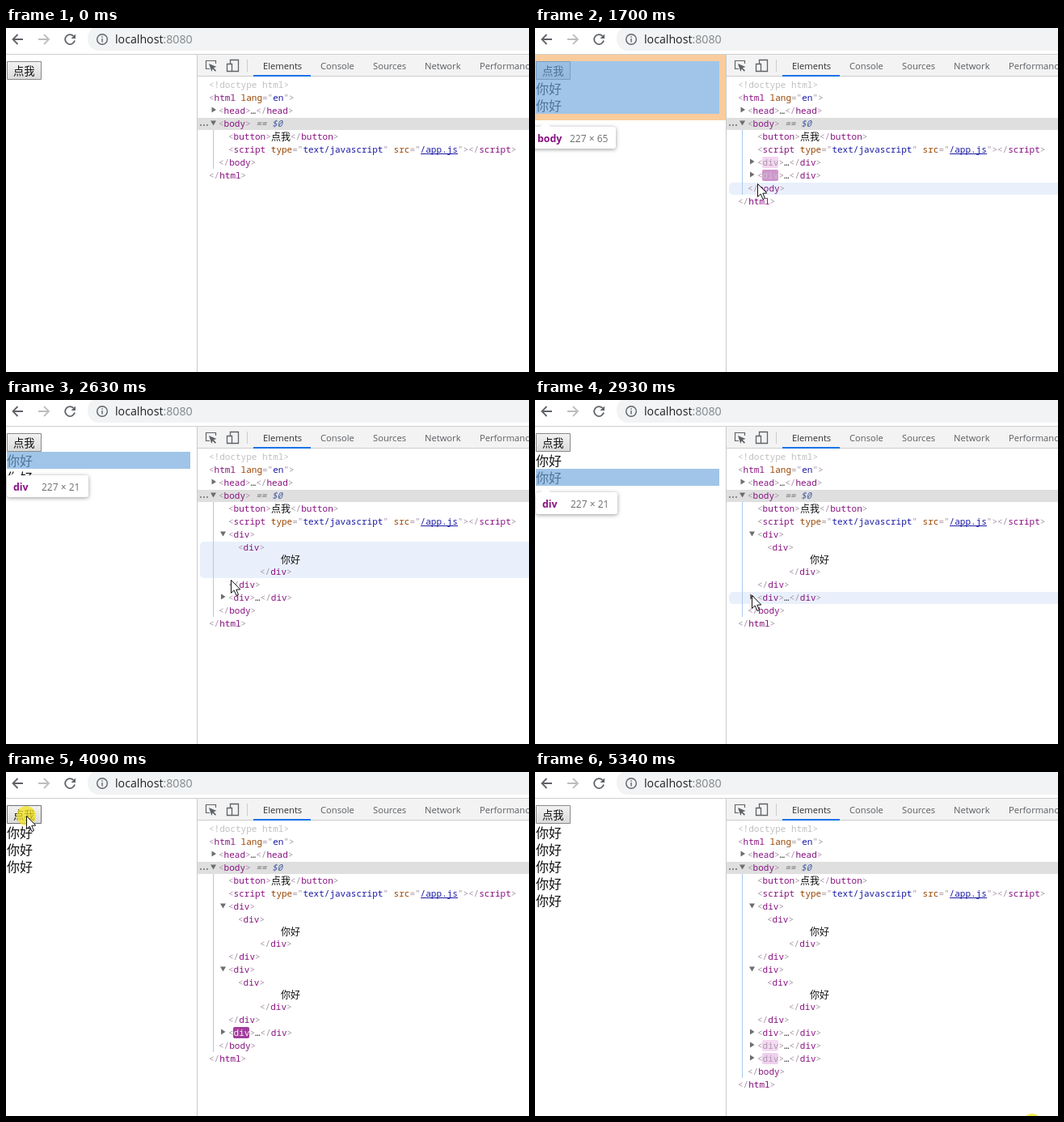
An HTML page with a canvas that plays this animation: 647 by 425 pixels, repeating every 5.42 s.

```html
<!DOCTYPE html>
<html lang="en">
<head>
<meta charset="utf-8">
<style>
html, body { margin: 0; width: 100%; height: 100%; overflow: hidden; background: #fff; }
canvas { display: block; }
</style>
</head>
<body>
<canvas id="stage" width="647" height="425"></canvas>
<script>
const c = document.getElementById('stage').getContext('2d');
const LOOP = 5420, TICK = 77.7, HOVER_LAG = 40;
const CJK = '"Noto Sans CJK SC", "Noto Sans CJK", "Noto Sans CJK JP", sans-serif';
const UI = '"Open Sans", "Noto Sans", sans-serif';
const CODE = '11px "Noto Sans Mono", "DejaVu Sans Mono", monospace';
const BRACKET = '#a894a6', TAG = '#881280', ATTR = '#994500', VALUE = '#1a1aa6', ICON = '#5f6368';

const added = [750, 1300, 3990, 4300, 4500];
const expanded = [2160, 3170];
const clicks = [...added, ...expanded, 5380];

// Cursor moves: start, end, x, y; equal times jump
const moves = [
  [130, 130, 47, 226],
  [130, 560, 16, 48],
  [1390, 1580, 262, 214],
  [1580, 1680, 275, 192],
  [1780, 2010, 268, 166],
  [2400, 2616, 278, 222],
  [2640, 2850, 268, 241],
  [3180, 3390, 83, 152],
  [3400, 3860, 25, 54],
  [4720, 4720, 615, 434],
];

const clamp = v => Math.max(0, Math.min(1, v));
const smooth = p => p * p * (3 - 2 * p);
const easeOut = p => 1 - (1 - p) ** 2;
const mix = (a, b, k) => a.map((v, i) => v + (b[i] - v) * k);
const rgb = v => `rgb(${v.map(Math.round)})`;

function cursorAt(t) {
  return moves.filter(m => m[0] <= t).reduce((pos, [from, to, x, y]) =>
    mix(pos, [x, y], to > from ? smooth(clamp((t - from) / (to - from))) : 1), [0, -40]);
}

function rect(x, y, w, h, color, r = 0) {
  c.fillStyle = color;
  c.beginPath();
  c.roundRect(x, y, w, h, r);
  c.fill();
}

function text(s, x, y, color, font) {
  c.font = font;
  c.fillStyle = color;
  c.fillText(s, x, y);
  return x + c.measureText(s).width;
}

function fill(d, color) {
  c.fillStyle = color;
  c.fill(new Path2D(d));
}

function stroke(d, color, width) {
  c.strokeStyle = color;
  c.lineWidth = width;
  c.stroke(new Path2D(d));
}

const code = (x, y, ...parts) =>
  parts.reduce((at, [color, s]) => text(s, at, y + 4, color, CODE), x);
const open = (name, color = TAG) => [[BRACKET, '<'], [color, name], [BRACKET, '>']];
const close = name => [[BRACKET, '</'], [TAG, name], [BRACKET, '>']];
const attr = (name, value) => [[ATTR, ' ' + name], [BRACKET, '="'], [VALUE, value], [BRACKET, '"']];
const dots = ['#222', '…'];

function toggle(x, y, down) {
  fill(down ? `M${x - 3.5} ${y - 3.5}h7l-3.5 6z` : `M${x - 2.5} ${y - 4.5}l5.5 3.5l-5.5 3.5z`, '#6e6e6e');
}

// Fading mark behind a new tag name; returns the text colour
function flash(x, y, age) {
  if (age >= 1290) return TAG;
  const k = easeOut(clamp(age / 1120));
  c.globalAlpha = 1 - clamp((age - 1120) / 170);
  rect(x, y - 7, 20, 14, rgb(mix([158, 54, 153], [245, 219, 244], k)), 2);
  c.globalAlpha = 1;
  return rgb(mix([255, 255, 255], [168, 148, 166], k));
}

function browserBar() {
  rect(101, -2, 580, 30, '#f1f3f4', 14);
  rect(0, 32, 647, 1, '#d0d0d0');
  stroke('M21 14H8.5M14.5 8l-6 6l6 6', ICON, 1.8);
  stroke('M40 14H53M47 8l6 6l-6 6', '#bcbec0', 1.8);
  stroke('M83.6 10A6 6 0 1 0 85 15.5', ICON, 1.8);
  fill('M86 7.5v5.5h-5.5z', ICON);
  stroke('M125.3 14a6.3 6.3 0 1 0 -12.6 0a6.3 6.3 0 1 0 12.6 0M119 13v4.5M119 10.3v1.5', ICON, 1.4);
  const x = text('localhost', 135, 19, '#202124', '14.2px ' + UI);
  text(':8080', x, 19, '#80868b', '14.2px ' + UI);
}

function tooltip(x, y, w, name, size) {
  c.save();
  c.shadowColor = 'rgba(0,0,0,.4)';
  c.shadowBlur = 5;
  c.shadowOffsetY = 1;
  rect(x, y, w, 27, '#fff', 3);
  c.restore();
  fill(`M6 ${y + 1}l7 -8l7 8z`, '#fff');
  const end = text(name, x + 8, y + 18.5, TAG, 'bold 12.4px ' + UI);
  text(size, Math.round(end) + 10 + (name === 'div' ? 6 : 0), y + 18.5, '#6e6e6e', '12px ' + UI);
}

// Overlay on the page for the hovered element; a number is a div
function highlight(part, count) {
  const blue = 'rgba(111,168,220,.66)', h = 23 + count * 21;
  if (part === 'html') {
    rect(0, 33, 236, h + 15, blue);
    tooltip(-5, h + 57, 105, part, `236 × ${h + 15}`);
  } else if (part === 'body') {
    c.fillStyle = 'rgba(246,178,107,.66)';
    c.beginPath();
    c.rect(0, 33, 236, h + 16);
    c.rect(1, 41, 227, h);
    c.fill('evenodd');
    rect(1, 41, 227, h, blue);
    tooltip(-5, h + 57, 105, part, `227 × ${h}`);
  } else {
    const y = 64 + part * 21;
    rect(1, y, 227, 21, blue);
    tooltip(1, y + 29, 101, 'div', '227 × 21');
  }
}

function page(count, over, hover) {
  c.save();
  c.beginPath();
  c.rect(0, 33, 236, 392);
  c.clip();
  const face = c.createLinearGradient(0, 41, 0, 64);
  face.addColorStop(0, '#f3f3f3');
  face.addColorStop(1, '#dadada');
  rect(1, 41, 43, 23, over ? '#707070' : '#8a8a8a', 1);
  rect(2, 42, 41, 21, face);
  text('点我', 9, 58, '#111', '13.33px ' + CJK);
  for (let i = 0; i < count; i++) text('你好', 1, 81 + i * 21, '#111', '16px ' + CJK);
  if (hover) highlight(hover.part, count);
  c.restore();
}

function tabs() {
  rect(236, 33, 1, 392, '#cacaca');
  rect(237, 33, 410, 27, '#f3f3f3');
  rect(237, 59, 410, 1, '#cdcdcd');
  rect(306, 58, 71, 2, '#1a73e8');
  rect(298, 39, 1, 15, '#ccc');
  stroke('M252 50.5H247.5V40.5H259.5V44', ICON, 1.2);
  fill('M251 44l9.5 4l-3.7 1.3l3.2 3.2l-1.2 1.2l-3.2 -3.2l-1.3 3.5z', ICON);
  stroke('M277.5 44V39.5H287.5V53.5H280M273.5 44.5H279.5V53.5H273.5Z', ICON, 1.3);
  let x = 318;
  for (const name of ['Elements', 'Console', 'Sources', 'Network', 'Performance'])
    x = Math.round(text(name, x, 51, x === 318 ? '#333' : '#5a5d61', '11.2px ' + UI)) + 23;
}

// Tree rows below the script tag, each with the page part it stands for
function layout(t) {
  const rows = [];
  let y = 158;
  const add = (h, part, paint) => {
    rows.push({ y, h, part, paint });
    y += h;
  };
  added.filter(start => start <= t).forEach((start, i) => {
    const isOpen = t >= expanded[i];
    add(16, i, y => {
      toggle(268.5, y, isOpen);
      code(275, y, ...open('div', flash(281, y, t - start)));
      if (!isOpen) code(308, y, dots, ...close('div'));
    });
    if (!isOpen) return;
    add(46, i, y => {
      code(287, y, ...open('div'));
      text('你好', 340, y + 19.5, '#111', '12px ' + CJK);
      code(314, y + 30, ...close('div'));
    });
    add(16, i, y => code(275, y, ...close('div')));
  });
  add(16, 'body', y => {
    rect(256, 126, 1, y - 118, '#a9cbf0');
    code(263, y, ...close('body'));
  });
  add(16, 'html', y => code(251, y, ...close('html')));
  return rows;
}

function tree(rows, hover) {
  rect(237, 111, 410, 15, '#dfdfdf');
  if (hover) rect(240, hover.y + 1, 412, hover.h - 1, '#e9f0fb', 5);
  code(251, 70, ['#c0c0c0', '<!doctype html>']);
  code(251, 86, [BRACKET, '<'], [TAG, 'html'], ...attr('lang', 'en'), [BRACKET, '>']);
  toggle(257, 102);
  code(263, 102, ...open('head'), dots, ...close('head'));
  for (const x of [240, 244, 248]) rect(x, 119, 2, 2, '#6e6e6e', 1);
  toggle(256.5, 118, true);
  const end = code(263, 118, ...open('body'));
  text('$0', text(' == ', end, 122, '#666', 'italic ' + CODE), 122, '#4a62a0', 'italic ' + CODE);
  code(275, 134, ...open('button'));
  code(text('点我', 328, 138.5, '#111', '12px ' + CJK), 134, ...close('button'));
  code(275, 150, [BRACKET, '<'], [TAG, 'script'], ...attr('type', 'text/javascript'),
    ...attr('src', '/app.js'), [BRACKET, '>'], ...close('script'));
  rect(513, 155, 46, 1, VALUE);
  for (const row of rows) row.paint(row.y + 8);
}

function pointer(t, [x, y]) {
  for (const at of clicks) {
    const [cx, cy] = cursorAt(at);
    if (t > at - 60 && t < at + 120) rect(cx - 12, cy - 12, 24, 24, 'rgba(242,227,30,.75)', 12);
  }
  c.save();
  c.translate(Math.round(x) + 0.5, Math.round(y) + 0.5);
  const arrow = 'M0 0v16l3.7 -3.4l2.8 6.4l2.5 -1l-2.7 -6.2l5 -.3z';
  fill(arrow, '#fff');
  stroke(arrow, '#111', 1);
  c.restore();
}

function draw(now) {
  // The screen refreshes in even steps after a first pause
  const time = now % LOOP;
  const t = time < 130 ? 0 : Math.min(5340, 130 + Math.floor((time - 130) / TICK) * TICK);
  const pos = cursorAt(t);
  const over = pos[0] < 44 && pos[1] > 41 && pos[1] < 64;
  const rows = layout(t);
  const [hx, hy] = cursorAt(t - HOVER_LAG);
  const hover = hx > 236 && rows.find(r => hy >= r.y && hy < r.y + r.h);
  rect(0, 0, 647, 425, '#fff');
  browserBar();
  page(added.filter(v => v <= t).length, over, hover);
  tabs();
  tree(rows, hover);
  pointer(t, pos);
}

const begin = performance.now();
(function frame() {
  draw(performance.now() - begin);
  requestAnimationFrame(frame);
})();
</script>
</body>
</html>
```
